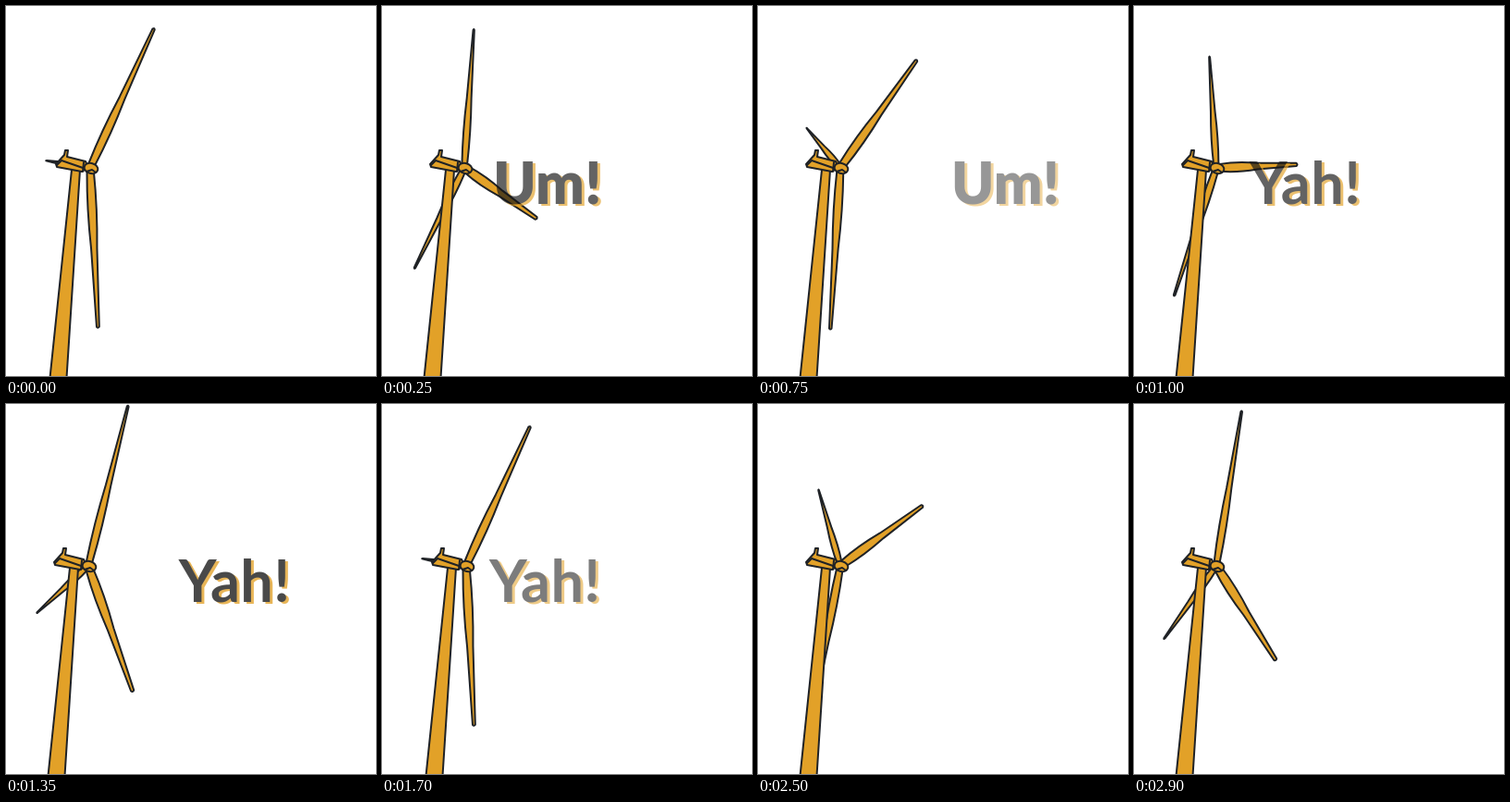
Animation of 400 by 400 pixels, one loop 3000 ms. Source, as an HTML page with a canvas:

```html
<!DOCTYPE html>
<html lang="en">
<head>
<meta charset="utf-8">
<title>Wind turbine</title>
<style>
html, body { margin: 0; width: 100%; height: 100%; overflow: hidden; background: #fff; }
canvas, svg { position: absolute; left: 0; top: 0; display: block; }
text { font: 700 63px Lato, sans-serif; letter-spacing: 0.4px; fill: #161616; }
.heavy { font-weight: 900; font-size: 62px; }
.shade { fill: #e2a128; }
</style>
</head>
<body>
<canvas id="stage" width="400" height="400"></canvas>
<svg id="words" width="400" height="400"></svg>
<script>
const ctx = document.getElementById('stage').getContext('2d');
const svg = document.getElementById('words');
const LOOP = 3000, WORD_GAP = 750;
const GOLD = '#e2a128', INK = '#1f2226';
const RAD = Math.PI / 180;
const OPENING_POSE = 5;

// A word and its offset shade share one group, so they fade as a whole
function addText(group, text, dx, dy, name) {
  const node = document.createElementNS(svg.namespaceURI, 'text');
  node.textContent = text;
  node.setAttribute('x', dx);
  node.setAttribute('y', dy);
  node.setAttribute('class', name);
  group.append(node);
}

const words = ['Um!', 'Yah!', 'Yah!'].map((text, i) => {
  const group = document.createElementNS(svg.namespaceURI, 'g');
  const weight = i ? '' : 'heavy';
  addText(group, text, 3, 216, weight + ' shade');
  addText(group, text, 0, 213.5, weight);
  svg.append(group);
  return { group, start: i * WORD_GAP, x: i ? 80.5 : 76 };
});

function placeWord({ group, start, x }, t) {
  const age = t - start;
  const ramp = Math.min(age + 50, 950 - age) / 450;
  group.setAttribute('opacity', age > 0 ? Math.max(0, Math.min(1, ramp)) : 0);
  group.setAttribute('transform', `translate(${x + age * 0.1772} 0)`);
}

function paint() {
  ctx.fillStyle = GOLD;
  ctx.fill();
  ctx.stroke();
}

function trace(...points) {
  ctx.beginPath();
  points.forEach(([x, y]) => ctx.lineTo(x, y));
}

function shape(...points) {
  trace(...points);
  ctx.closePath();
  paint();
}

function line(...points) {
  trace(...points);
  ctx.stroke();
}

// Path of a blade tip: a skewed ellipse, bent by the view from below
function tipAt(a) {
  const c = Math.cos(a), s = Math.sin(a);
  const c2 = Math.cos(2 * a), s2 = Math.sin(2 * a);
  return [
    100.7 - 18.6 * c + 70.9 * s - 2.1 * c2 - 6.4 * s2,
    179.7 - 140.3 * c - 97.8 * s + 17.2 * c2 - 10.6 * s2
  ];
}

function blade(hub, a) {
  const [x, y] = tipAt(a);
  const dx = x - hub[0], dy = y - hub[1];
  const len = Math.hypot(dx, dy);
  const facing = Math.cos(a - 140 * RAD);
  const w = 8.5 + 2 * facing, end = 1 + 0.7 * facing;
  ctx.save();
  ctx.translate(hub[0], hub[1]);
  ctx.rotate(Math.atan2(dy, dx));
  ctx.beginPath();
  ctx.moveTo(4, -w * 0.38);
  ctx.bezierCurveTo(len * 0.15, -w * 0.5, len * 0.3, -w * 0.55, len * 0.5, -w * 0.33);
  ctx.lineTo(len - 2, -end);
  ctx.quadraticCurveTo(len, 0, len - 2, end);
  ctx.lineTo(len * 0.5, w * 0.33);
  ctx.bezierCurveTo(len * 0.3, w * 0.55, len * 0.15, w * 0.5, 4, w * 0.38);
  ctx.closePath();
  paint();
  ctx.restore();
}

function turbine(t) {
  // Nine drawings, an opening one and eight steps of 15 degrees; restarts after 1700 ms
  const n = Math.floor(t / 100) % 17 % 9;
  const pose = n ? n - 1 : OPENING_POSE;
  const shift = pose === OPENING_POSE ? 2 : 0;
  const turn = pose * 15 + 3 * Math.cos((pose * 45 - 60) * RAD);

  ctx.save();
  [240, 0, 120].forEach(a => blade([89 + shift, 175], (a + turn) * RAD));
  ctx.translate(shift, 0);
  shape([69, 177], [78, 177], [63.5, 402], [45.5, 402]);
  shape([52, 171], [61, 161], [62, 156], [65, 156], [64, 163],
        [84, 168], [87, 175], [80, 179], [53, 174]);
  line([53, 172], [58, 167], [84, 176]);
  line([82, 169], [81, 179]);
  ctx.beginPath();
  ctx.ellipse(90, 175.5, 7.5, 5.5, 0.25, 0, Math.PI * 2);
  paint();
  line([85, 179], [91, 177], [95, 180]);
  ctx.restore();
}

function draw(now) {
  const t = Math.floor(now % LOOP / 50) * 50;
  ctx.clearRect(0, 0, 400, 400);
  ctx.strokeStyle = INK;
  ctx.lineWidth = 2;
  ctx.lineJoin = ctx.lineCap = 'round';
  turbine(t);
  words.forEach(w => placeWord(w, t));
}

const begin = performance.now();
function tick() {
  draw(performance.now() - begin);
  requestAnimationFrame(tick);
}
tick();
</script>
</body>
</html>
```
